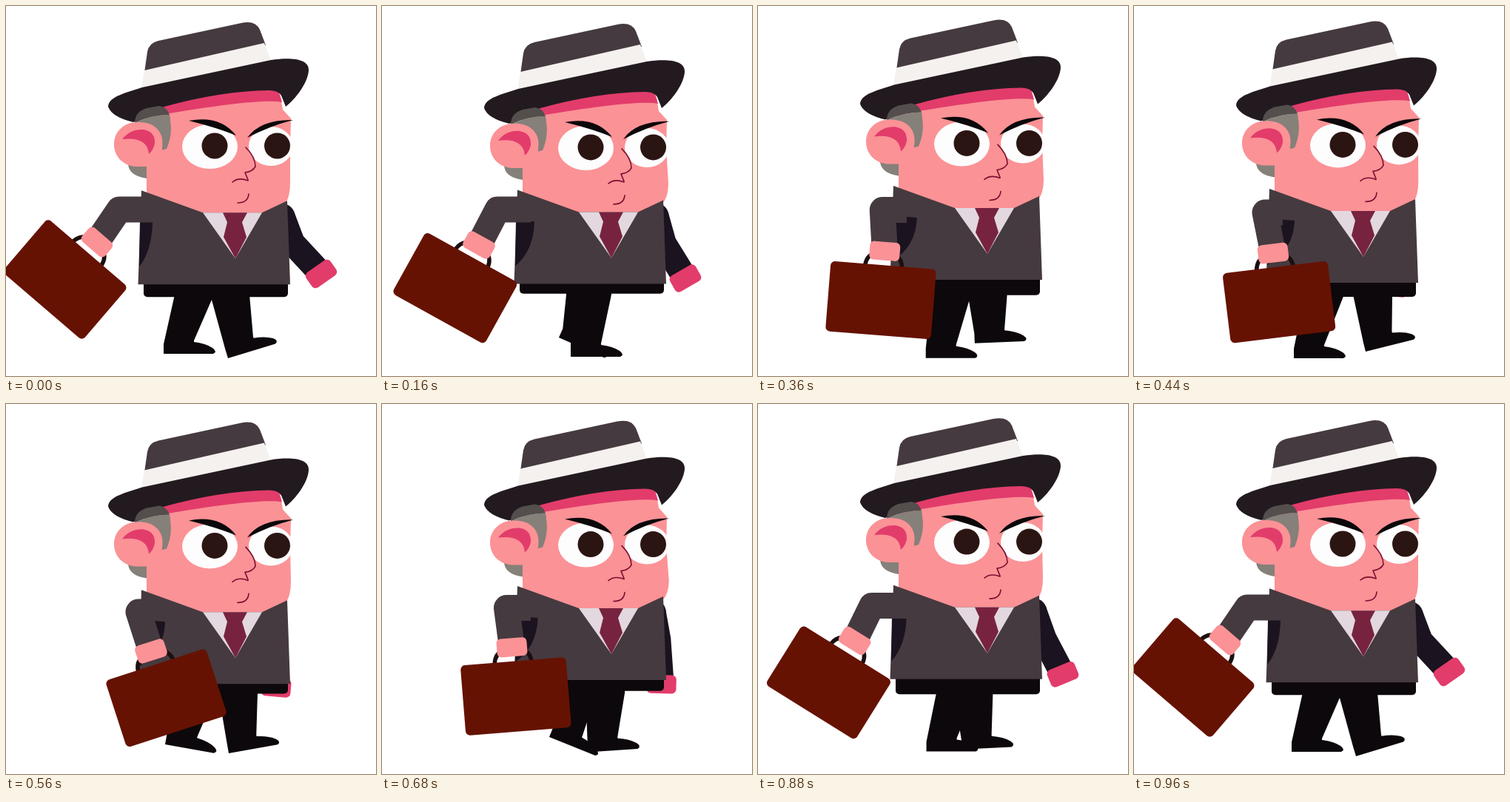
An HTML page with a canvas for the animation above (1000 ms loop, 500 px wide and 500 px high).

```html
<!DOCTYPE html>
<html lang="en">
<head>
<meta charset="utf-8">
<title>Walk cycle</title>
<style>
html, body { margin: 0; width: 100%; height: 100%; overflow: hidden; background: #fff; }
canvas { display: block; }
</style>
</head>
<body>
<canvas id="stage" width="500" height="500"></canvas>
<script>
const ctx = document.getElementById('stage').getContext('2d');
const STEP = 40, CYCLE = 24, LOOP = 25;
const C = {
  skin: '#fb9296', shade: '#e23c6b', suit: '#453a3f', dark: '#1b131f', pants: '#0c080b',
  brim: '#231a20', band: '#f4f1ee', hair: '#858079', hairDark: '#544e4d', line: '#7a1030',
  shirt: '#e3d8df', tie: '#77233f', leather: '#661202', handle: '#1c0f10',
  eye: '#fdfdfd', pupil: '#2b1512', brow: '#0b080a'
};

// Pose keys: time, then channels
const nearArm = [ // elbow x y, hand x y, case angle, armpit edge
  [0, 153, 275, 123, 319, 40.6, 198],
  [4, 156, 275, 131, 323, 29, 206],
  [7, 159, 273, 151, 327, 16.5, 211],
  [11, 177, 279, 188, 334, -7, 217],
  [14, 179, 281, 196, 334, -18, 215],
  [20, 156, 270, 145, 322, 17.5, 205]
];
const farArm = [ // elbow x y, hand x y, hand angle
  [0, 387, 320, 426, 362, -35],
  [4, 381, 321, 410, 368, -30],
  [7, 368, 318, 372, 373, 0],
  [11, 350, 320, 350, 380, 5],
  [14, 358, 322, 365, 383, 5],
  [20, 385, 314, 392, 371, -7]
];
const legA = [ // hip x, heel x y, foot angle
  [0, 276, 300, 476, -17],
  [4, 257, 255, 474, 0],
  [7, 242, 242, 475, 0],
  [11, 231, 216, 476, 0],
  [14, 231, 215, 460, 10],
  [17, 237, 226, 450, 22],
  [20, 248, 243, 455, 15]
];
const legB = [
  [0, 228, 213, 470, 0],
  [4, 249, 239, 448, 24],
  [7, 265, 263, 447, 14],
  [11, 296, 313, 467, -14],
  [14, 287, 301, 472, -10],
  [20, 260, 251, 469, 0]
];

// Periodic monotone cubic through the keys
function sample(keys, f) {
  const n = keys.length;
  const row = k => keys[(k + n) % n];
  const time = k => row(k)[0] + CYCLE * Math.floor(k / n);
  let i = n - 1;
  while (keys[i][0] > f) i--;
  const span = time(i + 1) - time(i), u = (f - time(i)) / span;
  return keys[0].slice(1).map((_, c) => {
    const v = k => row(k)[c + 1];
    const slope = k => (v(k + 1) - v(k)) / (time(k + 1) - time(k));
    const tangent = k => {
      const a = slope(k - 1), b = slope(k);
      return a * b > 0 ? 2 * a * b / (a + b) : 0;
    };
    const u2 = u * u, u3 = u2 * u;
    return v(i) * (2 * u3 - 3 * u2 + 1) + v(i + 1) * (3 * u2 - 2 * u3) +
      span * (tangent(i) * (u3 - 2 * u2 + u) + tangent(i + 1) * (u3 - u2));
  });
}

const rad = d => d * Math.PI / 180;
const wave = (f, mean, amp, peak) => mean + amp * Math.cos((f - peak) * Math.PI / 6);

function fill(d, color) {
  ctx.fillStyle = color;
  ctx.fill(new Path2D(d));
}
function stroke(d, color, width, cap = 'round') {
  ctx.strokeStyle = color;
  ctx.lineWidth = width;
  ctx.lineCap = cap;
  ctx.lineJoin = 'round';
  ctx.stroke(new Path2D(d));
}
function oval(x, y, rx, ry, color) {
  ctx.fillStyle = color;
  ctx.beginPath();
  ctx.ellipse(x, y, rx, ry, 0, 0, 2 * Math.PI);
  ctx.fill();
}
function box(x, y, w, h, r, color) {
  ctx.fillStyle = color;
  ctx.beginPath();
  ctx.roundRect(x, y, w, h, r);
  ctx.fill();
}
function at(x, y, deg, draw) {
  ctx.save();
  ctx.translate(x, y);
  ctx.rotate(rad(deg));
  draw();
  ctx.restore();
}

function drawLeg([hip, x, y, deg]) {
  const c = Math.cos(rad(deg)), s = Math.sin(rad(deg));
  const p = (lx, ly) => `${x + lx * c - ly * s},${y + lx * s + ly * c}`;
  fill(`M${hip},382 L${hip},390 L${p(0, -13)} L${p(0, 0)} L${p(67, 0)}
    Q${p(73, -3)} ${p(66, -8)} Q${p(57, -14)} ${p(41, -16)}
    L${p(41, -18)} L${hip + 53},390 L${hip + 53},382Z`, C.pants);
}

function drawFarArm([ex, ey, hx, hy, deg], base) {
  stroke(`M${355 + (ex - 350) / 2},${base - 92} L${ex},${ey} L${hx},${hy}`, C.dark, 34, 'butt');
  oval(355 + (ex - 350) / 2, base - 92, 17, 17, C.dark);
  at(hx, hy, deg, () => box(-20, -12.5, 40, 25, 6, C.shade));
}

function drawBody(base, armpit) {
  ctx.save();
  ctx.translate(0, base - 377);
  fill('M183,250 L266,280 H346 L380,264 L384,377 H178.5Z', C.suit);
  fill('M266,280 H346 L310,342Z', C.shirt);
  fill('M293,280 H326 L319,293 L325,313 L310,342 L294,313 L299,293Z', C.tie);
  fill(`M181,290 L${armpit},293 Q${armpit - 1},332 180,353Z`, C.dark);
  ctx.restore();
}

function drawNearArm([ex, ey, hx, hy, deg]) {
  stroke(`M201,${ey} L${ex},${ey} L${hx},${hy}`, C.suit, 35, 'butt');
  at(hx, hy, deg, () => {
    stroke('M-25,20 Q-23,6 -12,4 H12 Q23,6 25,20', C.handle, 5.5, 'butt');
    box(-20.5, -12.5, 41, 25, 6, C.skin);
    box(-71.5, 19, 143, 95, 6, C.leather);
  });
}

function drawHead(dy, jaw) {
  ctx.save();
  ctx.translate(0, dy);
  fill('M165,211 Q164,229 190,233 L195,210Z', C.hair);
  fill(`M190,150 L214,138 L371,122 L374,140 L385,152 L384,190 L${jaw},238
    Q${jaw},257 378,266 L345,290 H265 L190,255Z`, C.skin);
  fill('M209,147 L214,132 Q300,110 367,110 L373,130 Q345,124 209,147Z', C.shade);

  // Hat
  fill('M187,90 L191,62 Q193,50 206,47 L318,23 Q337,19 343,32 L351,53Z', C.suit);
  fill('M187,87 L349,50 L358,74 L183,112Z', C.band);
  fill(`M138,136 C138,122 164,117 184,110 L358,73 C385,69 410,71 409,87
    C408,104 391,126 378,136 L372,121 Q368,114 355,114 Q290,115 214,136
    L190,150 L172,157 Q143,150 138,136Z`, C.brim);

  // Hair and ear
  fill('M174,158 L220,146 Q227,170 217,193 L210,195 L190,185Z', C.hair);
  fill('M174,158 Q174,143 190,138 L207,135 Q217,136 221,147 Q197,147 174,158Z', C.hairDark);
  fill('M174,158 Q197,147 221,147 L222,153 L185,162Z', C.hair);
  fill(`M178,157 C200,156 215,170 211,192 L210,217 H176
    C158,216 146,203 146,187 C146,170 159,157 178,157Z`, C.skin);
  fill('M157,180 Q168,166 186,167 Q202,170 201,186 Q199,195 193,200 Q191,176 157,180Z', C.shade);

  // Eyes
  oval(275.5, 190, 37.5, 30, C.eye);
  oval(358, 189.5, 30, 26.5, C.eye);
  oval(282, 189, 17.5, 17.5, C.pupil);
  oval(366.5, 189, 17.5, 17.5, C.pupil);
  fill('M247,155 Q289,147 311,175 Q284,164 247,155Z', C.brow);
  fill('M326,178 Q344,153 388,154 Q357,162 326,178Z', C.brow);

  // Nose and mouth
  const nose = 'M324,191 C331,198 337,208 337,217 Q333,224 323,225';
  fill(nose + 'Z', C.skin);
  stroke(nose + ' L327,235', C.line, 1.6);
  stroke('M306,238 Q314,231 327,236', C.line, 1.6);
  stroke('M328,254 Q327,266 313,266', C.line, 1.6);
  ctx.restore();
}

function draw(f) {
  const base = wave(f, 373.6, 4.6, 1.8);
  const hem = wave(f, 390.4, 2.8, -0.3);
  const near = sample(nearArm, f);
  ctx.fillStyle = '#fff';
  ctx.fillRect(0, 0, 500, 500);
  drawFarArm(sample(farArm, f), base);
  drawLeg(sample(legB, f));
  drawLeg(sample(legA, f));
  box(186, base - 8, 195, hem - base + 8, 5, C.pants);
  drawHead(wave(f, -0.5, 3.1, 2.7), wave(f, 386, 2, 6));
  drawBody(base, near[5]);
  drawNearArm(near);
}

function tick() {
  const step = Math.floor(performance.now() / STEP) % LOOP;
  draw(step % CYCLE);
  requestAnimationFrame(tick);
}
tick();
</script>
</body>
</html>
```
